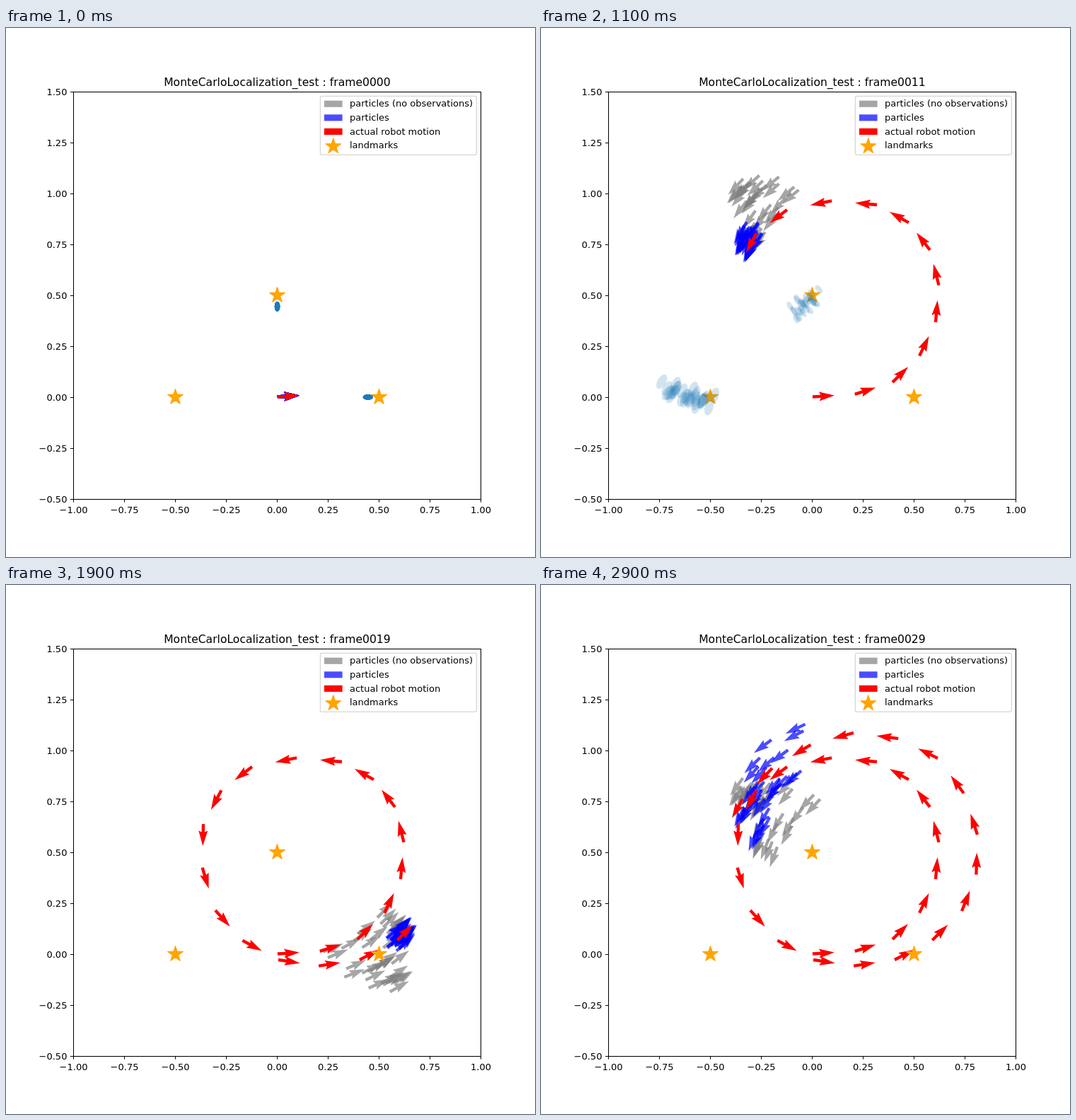
An HTML page with a canvas that plays this animation: 748x748 px, repeating every 3 s.

```html
<!DOCTYPE html>
<html lang="en">
<head>
<meta charset="utf-8">
<title>MonteCarloLocalization_test</title>
<style>
html, body { margin: 0; width: 100%; height: 100%; overflow: hidden; background: #fff; }
canvas { display: block; width: 748px; height: 748px; }
</style>
</head>
<body>
<canvas id="plot" width="748" height="748"></canvas>
<script>
const ctx = document.getElementById('plot').getContext('2d');
const FONT = '"DejaVu Sans", sans-serif';
const STEP = 100, STEPS = 30, COUNT = 32, CLUMPS = 9;
const RAD = Math.PI / 180;
const AX = { x: 95.5, y: 90, size: 576 };
const UNIT = AX.size / 2;
const px = x => AX.x + (x + 1) * UNIT;
const py = y => AX.y + (1.5 - y) * UNIT;

const GREY = 'rgba(128,128,128,.7)', BLUE = 'rgba(0,0,255,.7)', RED = '#f00', ORANGE = '#ffa500';
const LANDMARKS = [[-0.5, 0], [0, 0.5], [0.5, 0]].map(([x, y]) => [px(x), py(y)]);

// Robot track: one spline point every second step, with a guide point at each end
const TRACK = [
  [271, 501], [384, 521.5], [497, 501], [558, 416], [550, 314], [475, 250],
  [348, 257], [279, 338], [296, 460], [385, 530], [500, 530], [595, 461],
  [617, 353], [561, 245], [442, 209], [327, 259], [257, 353], [250, 460]
];

// Cloud keys: step, centre along and across the heading, radius along and across
const GREY_KEYS = [[0, 0, 0, 0.3, 0.3], [4, 18, 5, 20, 20], [11, -50, 15, 56, 46], [19, -48, -8, 66, 64], [29, -15, -40, 66, 66]];
const BLUE_KEYS = [[0, 0, 0, 0.3, 0.3], [4, 5, 12, 22, 20], [19, -5, -2, 16, 15], [25, -28, 5, 58, 42], [29, -48, -25, 108, 38]];

const mix = (a, b, t) => a + (b - a) * t;
const turn = (x, y, a) => [x * Math.cos(a) - y * Math.sin(a), x * Math.sin(a) + y * Math.cos(a)];

function position(step) {
  const k = Math.floor(step / 2);
  if (step % 2 === 0) return TRACK[k + 1];
  const [a, b, c, d] = TRACK.slice(k, k + 4);
  return b.map((v, i) => (9 * (v + c[i]) - a[i] - d[i]) / 16);
}

// Each arrow heads for the next position
const robot = Array.from({ length: STEPS }, (_, step) => {
  const [x, y] = position(step), [nx, ny] = position(step + 1);
  return [x, y, Math.atan2(ny - y, nx - x)];
});

function random(seed) {
  return () => {
    seed = (seed + 0x6D2B79F5) | 0;
    let t = Math.imul(seed ^ (seed >>> 15), 1 | seed);
    t = (t + Math.imul(t ^ (t >>> 7), 61 | t)) ^ t;
    return ((t ^ (t >>> 14)) >>> 0) / 4294967296;
  };
}

// Unit-disc places, gathered in clumps as resampling leaves them
function scatter(seed) {
  const rnd = random(seed), wobble = () => rnd() * 2 - 1;
  return Array.from({ length: COUNT }, () => {
    const c = Math.floor(rnd() * CLUMPS);
    const r = Math.sqrt((c + 0.5) / CLUMPS), a = c * 2.4;
    return [r * Math.cos(a) * 0.85 + wobble() * 0.24, r * Math.sin(a) * 0.85 + wobble() * 0.24, wobble()];
  });
}

function keyed(keys, step) {
  let k = 0;
  while (k < keys.length - 2 && step >= keys[k + 1][0]) k++;
  const [a, b] = [keys[k], keys[k + 1]];
  const t = (step - a[0]) / (b[0] - a[0]);
  return a.slice(1).map((v, i) => mix(v, b[i + 1], t));
}

const greySpots = scatter(7), blueSpots = scatter(21);

// Particles that lag behind have turned less
function cloud(spots, keys, step, color) {
  const [x, y, heading] = robot[step];
  const [cu, cv, ru, rv] = keyed(keys, step);
  for (const [u, v] of spots) {
    const along = cu + u * ru, across = cv + v * rv;
    const [dx, dy] = turn(along, across, heading);
    arrow([x + dx, y + dy, heading - along * 0.26 * RAD], color);
  }
}

function arrow([x, y, angle], color) {
  const w = 4.32, len = 31, h = w / 2;
  const half = [[0, h], [len - 4.5 * w, h], [len - 5 * w, 3 * h], [len, 0]];
  const outline = [...half, ...half.slice(0, 3).reverse().map(([a, b]) => [a, -b])];
  ctx.beginPath();
  for (const [a, b] of outline) {
    const [dx, dy] = turn(a, b, angle);
    ctx.lineTo(x + dx, y + dy);
  }
  ctx.closePath();
  ctx.fillStyle = color;
  ctx.fill();
}

function star(x, y) {
  ctx.beginPath();
  for (let i = 0; i < 10; i++) {
    const r = i % 2 ? 4.3 : 11.3, a = (i * 36 - 90) * RAD;
    ctx.lineTo(x + r * Math.cos(a), y + r * Math.sin(a));
  }
  ctx.closePath();
  ctx.fillStyle = ctx.strokeStyle = ORANGE;
  ctx.lineWidth = 1.3;
  ctx.lineJoin = 'round';
  ctx.fill();
  ctx.stroke();
  ctx.lineJoin = 'miter';
}

// Where the particles place each landmark in view
function sightings(step) {
  if (step >= 19) return;
  const [x, y, heading] = robot[step];
  const [, , ru, rv] = keyed(BLUE_KEYS, step);
  const sway = 12 * RAD * Math.sin(Math.PI * step / 14);
  const fan = 0.14 * Math.min(1, step / 4);
  ctx.fillStyle = 'rgba(31,119,180,.2)';
  for (const [lx, ly] of LANDMARKS) {
    const range = Math.hypot(lx - x, ly - y);
    const bearing = Math.atan2(ly - y, lx - x);
    if (range > UNIT || Math.cos(bearing - heading) < -0.08) continue;
    const dist = range * (0.89 + 0.013 * step);
    const long = (5 + 0.07 * dist) / 2;
    for (const [u, v, w] of blueSpots) {
      const [ox, oy] = turn(u * ru * 0.8, v * rv * 0.8, heading);
      const dir = bearing + sway + w * fan;
      ctx.beginPath();
      ctx.ellipse(x + ox + dist * Math.cos(dir), y + oy + dist * Math.sin(dir), long, long * 0.54, dir, 0, 2 * Math.PI);
      ctx.fill();
    }
  }
}

function text(str, x, y, align = 'left', size = 13) {
  ctx.font = `${size}px ${FONT}`;
  ctx.textAlign = align;
  ctx.fillStyle = '#000';
  ctx.fillText(str, x, y);
}

function line(x1, y1, x2, y2) {
  ctx.beginPath();
  ctx.moveTo(x1, y1);
  ctx.lineTo(x2, y2);
  ctx.stroke();
}

function axes() {
  const { x, y, size } = AX, tick = 4.6;
  const label = v => (v < 0 ? '\u2212' : '') + Math.abs(v).toFixed(2);
  ctx.strokeStyle = '#000';
  ctx.lineWidth = 1.04;
  ctx.strokeRect(x, y + 0.5, size, size);
  for (let i = 0; i <= 8; i++) {
    const vx = -1 + i / 4, vy = -0.5 + i / 4;
    line(px(vx), y + size, px(vx), y + size + tick);
    line(x, py(vy) + 0.5, x - tick, py(vy) + 0.5);
    text(label(vx), px(vx), 685.5, 'center');
    text(label(vy), 86.4, py(vy) + 4.8, 'right');
  }
}

function legend(left) {
  ctx.save();
  ctx.translate(left ? -342 : 0, 0);
  ctx.beginPath();
  ctx.roundRect(444.4, 96.4, 221, 83, 2.6);
  ctx.fillStyle = 'rgba(255,255,255,.8)';
  ctx.fill();
  ctx.strokeStyle = 'rgba(204,204,204,.8)';
  ctx.lineWidth = 1.3;
  ctx.stroke();
  const rows = [['particles (no observations)', GREY], ['particles', BLUE], ['actual robot motion', RED], ['landmarks']];
  rows.forEach(([name, color], i) => {
    const y = 107.2 + i * 19.6;
    if (color) {
      ctx.fillStyle = color;
      ctx.fillRect(450, y - 4.5, 25.6, 9.1);
    } else star(462.8, y + 1.3);
    text(name, 486, y + 4.2);
  });
  ctx.restore();
}

function draw(step) {
  ctx.fillStyle = '#fff';
  ctx.fillRect(0, 0, 748, 748);
  ctx.save();
  ctx.beginPath();
  ctx.rect(AX.x, AX.y, AX.size, AX.size);
  ctx.clip();
  cloud(greySpots, GREY_KEYS, step, GREY);
  cloud(blueSpots, BLUE_KEYS, step, BLUE);
  robot.slice(0, step + 1).forEach(pose => arrow(pose, RED));
  LANDMARKS.forEach(([x, y]) => star(x, y));
  sightings(step);
  ctx.restore();
  axes();
  text(`MonteCarloLocalization_test : frame${String(step).padStart(4, '0')}`, 383.4, 82.2, 'center', 15.6);
  legend(step >= 25 && step <= 27);
}

let start = null, shown = -1;
function tick(now) {
  if (start === null) start = now;
  const step = Math.floor((now - start) / STEP) % STEPS;
  if (step !== shown) draw(shown = step);
  requestAnimationFrame(tick);
}
draw(0);
requestAnimationFrame(tick);
</script>
</body>
</html>
```
